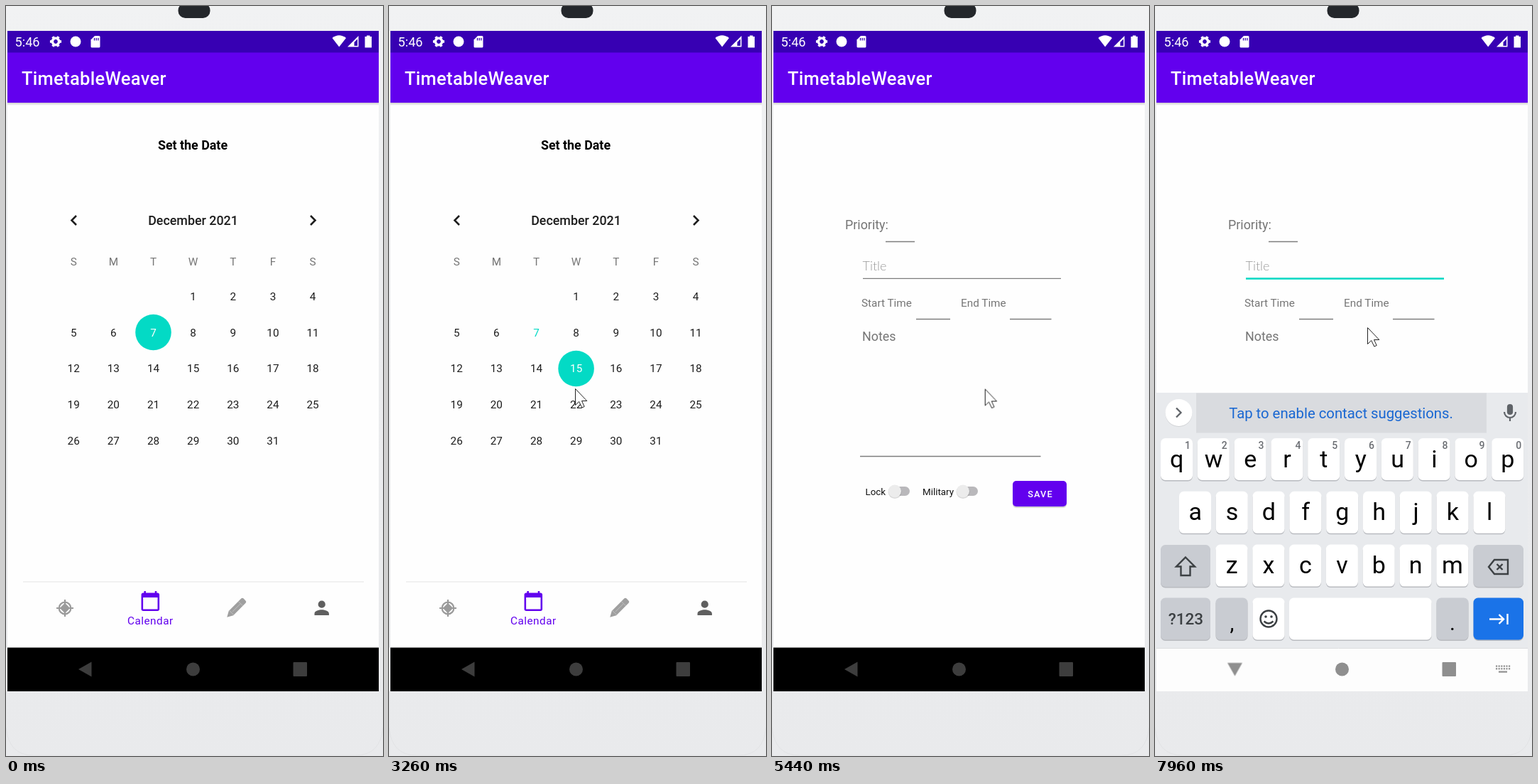
An HTML page that plays this animation: 531 by 1055 pixels, repeating every 8 s.

```html
<!DOCTYPE html>
<html lang="en">
<head>
<meta charset="utf-8">
<title>Planner demo</title>
<style>
html, body { margin: 0; height: 100%; overflow: hidden; background: #eaebed; }
svg { display: block; width: 531px; height: 1055px; font-family: Roboto, sans-serif; }
.mid { text-anchor: middle; }
.t14 { font-size: 17.86px; }
.t12 { font-size: 15.3px; }
.grey { fill: #757575; }
.med { font-weight: 500; }
.btn { font-size: 12.7px; font-weight: 500; letter-spacing: 1.13px; fill: #fff; }
.sw { font-size: 13.4px; fill: #111; }
.line { stroke: #7d7d7d; stroke-width: 1.3; }
.anim { animation: 8s linear infinite; }
.cut { animation: 8s step-end infinite; }

#cursor { animation-name: cursor; }
#ripple { animation-name: ripple; transform-origin: 203px 846.5px; }
#sel7, #sel15 { fill: #03dac5; }
#sel7 { animation-name: drop; }
#sel15 { animation-name: pick; }
#d7 { animation-name: ink7; }
#d15 { animation-name: ink15; }
#panel { animation-name: panel; }
#press { animation-name: press; }
#form { animation-name: form; }
#focus { animation-name: focus; }
#caret { animation-name: caret; }
#keys { animation: slide 8s linear infinite, fade 8s linear infinite; }
#navWhite { animation-name: navWhite; }
#navIcons { animation-name: navIcons; }
#back { animation-name: back; transform-origin: 112px 932.5px; }
#imeIcon { animation-name: imeIcon; }

@keyframes cursor {
  0%, 3.3% { transform: translate(446px, 1062px); }
  3.375% { transform: translate(438px, 1040px); }
  5% { transform: translate(340px, 958px); }
  6.75% { transform: translate(246px, 878px); }
  8.5% { transform: translate(190px, 836px); }
  9.4% { transform: translate(174px, 827px); }
  10.25%, 14.4% { transform: translate(184px, 830px); }
  14.5%, 16.9% { transform: translate(168px, 822px); }
  17.9% { transform: translate(178px, 833px); }
  18.8%, 21.2% { transform: translate(185px, 839px); }
  23.5% { transform: translate(216px, 715px); }
  26.375% { transform: translate(250px, 597px); }
  29% { transform: translate(260px, 538px); }
  31% { transform: translate(262px, 525px); }
  34% { transform: translate(262px, 528px); }
  35.75%, 42% { transform: translate(262px, 538px); }
  47.6% { transform: translate(316px, 494px); }
  48.5% { transform: translate(346px, 539px); }
  49.4% { transform: translate(366px, 590px); }
  50.25% { transform: translate(378px, 628px); }
  52%, 58% { transform: translate(383px, 649px); }
  63.75%, 65.4% { transform: translate(351px, 667px); }
  66.25% { transform: translate(341px, 636px); }
  68% { transform: translate(300px, 539px); }
  69.75% { transform: translate(260px, 464px); }
  71.5% { transform: translate(236px, 418px); }
  73.25% { transform: translate(224px, 398px); }
  75%, 77.4% { transform: translate(224px, 408px); }
  80% { transform: translate(207px, 391px); }
  82.5%, 84.9% { transform: translate(200px, 384px); }
  85%, 96.9% { transform: translate(194px, 374px); }
  97.75% { transform: translate(214px, 389px); }
  98.6% { transform: translate(262px, 426px); }
  99.5%, 100% { transform: translate(299px, 452px); }
}
@keyframes ripple {
  0%, 16.9% { transform: scale(.35); opacity: 0; }
  19.4%, 22% { transform: none; opacity: 1; }
  25%, 100% { transform: none; opacity: 0; }
}
@keyframes drop { 0% { opacity: 1; } 32%, 100% { opacity: 0; } }
@keyframes pick { 0% { opacity: 0; } 32%, 100% { opacity: 1; } }
@keyframes ink7 { 0% { fill: #fff; } 32%, 100% { fill: #03dac5; } }
@keyframes ink15 { 0% { fill: #1d1d1d; } 32%, 100% { fill: #fff; } }
@keyframes panel { 0%, 41.5% { opacity: 0; } 43%, 100% { opacity: 1; } }
@keyframes press { 0%, 53.7% { opacity: 0; } 55.5%, 57% { opacity: .24; } 60%, 100% { opacity: 0; } }
@keyframes form {
  0%, 58% { opacity: 0; transform: translateY(38px); animation-timing-function: cubic-bezier(.2, 0, .1, 1); }
  63.5%, 100% { opacity: 1; transform: none; }
}
@keyframes focus { 0% { opacity: 0; } 86.75%, 100% { opacity: 1; } }
@keyframes caret { 0% { opacity: 0; } 87.5% { opacity: 1; } 94%, 100% { opacity: 0; } }
@keyframes slide {
  0%, 89.38% { transform: translateY(420px); animation-timing-function: cubic-bezier(.4, 0, .2, 1); }
  94.38%, 100% { transform: none; }
}
@keyframes fade { 0%, 89.38% { opacity: 0; } 94.38%, 100% { opacity: 1; } }
@keyframes navWhite { 0%, 92.5% { opacity: 0; } 94.4%, 100% { opacity: 1; } }
@keyframes navIcons { 0%, 89.4% { fill: #3d3d3d; } 91%, 92% { fill: #b8b8b8; } 94.4%, 100% { fill: #8f8f8f; } }
@keyframes back { 0% { transform: none; } 93.5%, 100% { transform: rotate(-90deg); } }
@keyframes imeIcon { 0%, 89.4% { opacity: 0; } 91%, 100% { opacity: 1; } }
</style>
</head>
<body>
<svg viewBox="0 0 531 1055">
  <defs>
    <linearGradient id="case" x2="0" y2="1">
      <stop stop-color="#f1f2f3"/><stop offset=".5" stop-color="#ebecee"/><stop offset="1" stop-color="#e9eaec"/>
    </linearGradient>
    <linearGradient id="shade" x2="0" y2="1">
      <stop stop-color="#000" stop-opacity=".2"/><stop offset="1" stop-color="#000" stop-opacity="0"/>
    </linearGradient>
    <clipPath id="screen"><path d="M2 35H525V963.600H2z"/></clipPath>
    <clipPath id="tabs"><path d="M2 811H525V882H2z"/></clipPath>
    <g id="appBar">
      <path fill="url(#shade)" d="M2 136H525V140H2z"/>
      <path fill="#6200ee" d="M2 65H525V136H2z"/>
      <text x="22" y="110.500" class="med" font-size="25.5" letter-spacing=".3" fill="#fff">TimetableWeaver</text>
    </g>
    <g id="switch">
      <rect x="-6" y="-6.500" width="27" height="13" rx="6.500" fill="#b9b8bb"/>
      <circle cy="1" r="9.500" fill="#000" opacity=".14"/>
      <circle r="9" fill="#ececec"/>
    </g>
  </defs>

  <path fill="url(#case)" d="M0 0H531V1055H0z"/>
  <path d="M0 1015Q4 1054 38 1054H493Q527 1054 531 1015" fill="none" stroke="#e2e3e5"/>
  <rect x="242.500" y="-4" width="45" height="21" rx="10" fill="#24272b"/>

  <g clip-path="url(#screen)">
    <path fill="#fefefe" d="M2 35H525V964H2z"/>
    <use href="#appBar"/>
    <text x="263" y="202" class="mid t14" font-weight="700">Set the Date</text>
    <g id="calendar" class="mid t12" fill="#1d1d1d">
      <text x="263.500" y="307.500" class="t14 med">December 2021</text>
      <path d="M99 295l-6.500 6.500 6.500 6.500M429 295l6.500 6.500-6.500 6.500" fill="none" stroke="#1d1d1d" stroke-width="2.600"/>
      <circle id="sel7" class="cut" cx="207.500" cy="459" r="25.300"/>
      <circle id="sel15" class="cut" cx="263.600" cy="510" r="25.300"/>
    </g>

    <g id="panel" class="anim">
      <path fill="#fefefe" d="M98 262H420V692H98z"/>
      <text x="98" y="283" class="t14 grey">TextView</text>
      <text x="314" y="286" class="sw">Priority</text>
      <use href="#switch" x="369.500" y="281"/>
      <rect x="297" y="646" width="113" height="46" rx="5" opacity=".16"/>
      <rect x="297" y="644" width="113" height="46" rx="5" fill="#6200ee"/>
      <rect id="press" class="anim" x="297" y="644" width="113" height="46" rx="5" fill="#fff"/>
      <g class="btn mid"><text x="354" y="665">CREATE</text><text x="354" y="680">CARD</text></g>
    </g>

    <path d="M24 810H504" stroke="#ededed" stroke-width="1.300"/>
    <g clip-path="url(#tabs)"><circle id="ripple" class="anim" cx="203" cy="846.500" r="70" fill="#e6d6fa"/></g>
    <g transform="translate(83 847)" fill="none" stroke="#9b9b9b" stroke-width="2.200">
      <circle r="8.300"/>
      <path d="M0-12V12M-12 0H12"/>
      <rect x="-4" y="-4" width="8" height="8" rx="1" transform="rotate(45)" fill="#9b9b9b"/>
    </g>
    <g fill="#6200ee">
      <path transform="translate(188 821.700) scale(1.276)" d="M20 3h-1V1h-2v2H7V1H5v2H4c-1.100 0-2 .9-2 2v16c0 1.100.9 2 2 2h16c1.100 0 2-.9 2-2V5c0-1.100-.9-2-2-2zm0 18H4V8h16z"/>
      <text x="203.300" y="869.500" class="mid t12" letter-spacing=".5">Calendar</text>
    </g>
    <g transform="translate(324 847) rotate(-45)">
      <path fill="#9f9f9f" d="M-18 0L-10-4.500H14Q17-4.500 17-2V2Q17 4.500 14 4.500H-10z"/>
      <path d="M-9-4V4M9-4V4M-7 0H8" stroke="#b9b9b9" stroke-width="1"/>
    </g>
    <path transform="translate(429.400 831.500) scale(1.276)" fill="#5f5f5f" d="M12 12a4 4 0 1 0 0-8 4 4 0 0 0 0 8zm0 2c-2.670 0-8 1.340-8 4v2h16v-2c0-2.660-5.330-4-8-4z"/>

    <g id="form" class="anim">
      <path fill="#fefefe" d="M2 65H525V964H2z"/>
      <use href="#appBar"/>
      <g class="grey t14">
        <text x="103" y="313.500">Priority:</text>
        <text x="127" y="471">Notes</text>
        <text x="126" y="422.500" class="t12">Start Time</text>
        <text x="266" y="422.500" class="t12">End Time</text>
      </g>
      <text x="127.500" y="371.500" font-family="Lato, sans-serif" font-weight="300" font-size="18" fill="#999">Title</text>
      <path class="line" d="M160 331.500H201M128 383.300H407M203 440.500H251M335 440.500H393.500M124 633.500H378.500"/>
      <path id="focus" class="cut" d="M128 383.500H407" stroke="#03dac5" stroke-width="2.600"/>
      <path id="caret" class="cut" d="M129 352V380" stroke="#03dac5" stroke-width="2.200"/>
      <text x="131.500" y="687.500" class="sw">Lock</text>
      <use href="#switch" x="173" y="682.500"/>
      <text x="212" y="687.500" class="sw">Military</text>
      <use href="#switch" x="269" y="682.500"/>
      <rect x="339" y="670" width="76" height="36" rx="5" opacity=".16"/>
      <rect x="339" y="668" width="76" height="36" rx="5" fill="#6200ee"/>
      <text x="378" y="691" class="btn mid">SAVE</text>
    </g>

    <path fill="#3700b3" d="M2 35H525V65.500H2z"/>
    <g fill="#fff">
      <text x="12.500" y="57" font-size="18.200">5:46</text>
      <g transform="translate(70 50)" fill="none" stroke="#fff">
        <circle r="4.700" stroke-width="3.600"/>
        <circle r="6.900" stroke-width="2.400" pathLength="12" stroke-dasharray="1 1" stroke-dashoffset=".5"/>
      </g>
      <circle cx="98" cy="50" r="7.500"/>
      <path d="M119.500 47.500L125 42H131Q132.500 42 132.500 43.500V57Q132.500 58.500 131 58.500H121Q119.500 58.500 119.500 57z"/>
      <path d="M124.500 45V48.500M127.200 45V48.500M129.900 45V48.500" stroke="#3700b3" stroke-width="1.300"/>
      <path d="M459.500 45Q469 37.500 479 45L469.200 57.500z"/>
      <path d="M496.500 42V57.500H481z"/>
      <path d="M495 46.500V56H490.500V51z" fill="#3700b3"/>
      <path d="M508 41.500H512.500V43H515V58.500H505.500V43H508z"/>
    </g>

    <path d="M2 902.600H525V964H2z"/>
    <g id="keys">
      <path fill="#e8eaed" d="M2 544H525V980H2z"/>
      <path fill="#d9dbdf" d="M58 544.500H467V600.500H58z"/>
      <circle cx="33.500" cy="573" r="19" opacity=".1"/>
      <circle cx="33.500" cy="572" r="19" fill="#fff"/>
      <path d="M30 565.500l6.500 6.500-6.500 6.500" fill="none" stroke="#5f6368" stroke-width="2.300"/>
      <text x="262" y="580" class="mid" font-size="20.300" fill="#1967d2">Tap to enable contact suggestions.</text>
      <g fill="none" stroke="#5f6368" stroke-width="2.200">
        <rect x="497" y="561" width="6" height="13" rx="3" fill="#5f6368"/>
        <path d="M492 571a8 8 0 0 0 16 0M500 579V584"/>
      </g>
      <g id="caps"></g>
      <g fill="none" stroke="#3c4043" stroke-width="2.400">
        <path d="M43 775.500L56 788.500H49.500V801H36.500V788.500H30z"/>
        <path d="M478 779H497V799H478L470 789z"/>
        <path d="M481.500 785l8 8M489.500 785l-8 8"/>
        <circle cx="160" cy="862" r="11.500"/>
        <path d="M153.500 865.500q6.500 6 13 0"/>
        <path d="M471 862.500H490.500M484.500 856l6.500 6.500-6.500 6.500M496.500 855V870" stroke="#fff"/>
      </g>
      <g fill="#3c4043"><circle cx="156" cy="859" r="1.800"/><circle cx="164" cy="859" r="1.800"/></g>
      <g class="mid">
        <text x="43.500" y="870" class="med" font-size="22.500" fill="#3c4043">?123</text>
        <text x="108.500" y="878" font-size="30">,</text>
        <text x="419" y="878" font-size="30">.</text>
      </g>
    </g>
    <g id="navWhite" class="anim">
      <path fill="#fdfdfd" d="M2 903H525V964H2z"/>
      <path d="M2 903.500H525" stroke="#dcdddf"/>
    </g>
    <g id="navIcons" class="anim">
      <path id="back" class="cut" d="M102 933L120.500 922.500V943.500z"/>
      <circle cx="263.500" cy="933" r="9.500"/>
      <rect x="404.500" y="923" width="19.500" height="20" rx="1"/>
      <g id="imeIcon" class="anim"></g>
    </g>
  </g>

  <g id="cursor" class="anim">
    <path d="M.5.5V23.500L5.700 18.500 9.800 27 13.200 25.500 9.500 17.500H16.800z" fill="#fff" stroke="#222" stroke-linejoin="round"/>
  </g>
</svg>
<script>
const add = (id, markup) => document.getElementById(id).insertAdjacentHTML('beforeend', markup);
const label = (x, y, text, attrs = '') => `<text x="${x}" y="${y}" ${attrs}>${text}</text>`;
const colX = i => 95.200 + 56.150 * i;

[...'SMTWTFS'].forEach((d, i) => add('calendar', label(colX(i), 365, d, 'class="grey"')));
for (let d = 1; d <= 31; d++) {
  const cell = d + 2;
  const attrs = d === 7 || d === 15 ? `id="d${d}" class="cut"` : '';
  add('calendar', label(colX(cell % 7), 413.700 + 50.800 * Math.floor(cell / 7), d, attrs));
}

const key = (x, y, w, fill = '#fff') => [['#b9bbc0', 1.500], [fill, 0]].map(([c, dy]) =>
  `<rect x="${x}" y="${y + dy}" width="${w}" height="59" rx="6.500" fill="${c}"/>`).join('');
const pitch = 51.800;

[['qwertyuiop', 8], ['asdfghjkl', 34], ['zxcvbnm', 85.500]].forEach(([letters, left], row) => {
  const y = 608 + 74.800 * row;
  [...letters].forEach((c, i) => {
    const x = left + pitch * i;
    add('caps', key(x, y, 45) + label(x + 22.700, y + 40.500, c, 'class="mid" font-size="34"'));
    if (!row) add('caps', label(x + 38, 623, (i + 1) % 10, 'class="mid med" font-size="14" fill="#6b6e73"'));
  });
});

const dim = '#c9ccd2';
add('caps', key(8, 758, 70, dim) + key(448.500, 758, 70.500, dim) +
  key(8, 832.500, 70, dim) + key(85.500, 832.500, 45, dim) + key(137.500, 832.500, 45) +
  key(189, 832.500, 200.500) + key(396.500, 832.500, 45, dim) + key(448.500, 832.500, 70.500, '#1a73e8'));

for (let r = 0; r < 2; r++)
  for (let i = 0; i < 6; i++)
    add('imeIcon', `<rect x="${480 + 3.600 * i}" y="${927.500 + 3.700 * r}" width="2.200" height="2.200"/>`);
add('imeIcon', '<rect x="484" y="935.500" width="12" height="2.200"/>');
</script>
</body>
</html>
```
